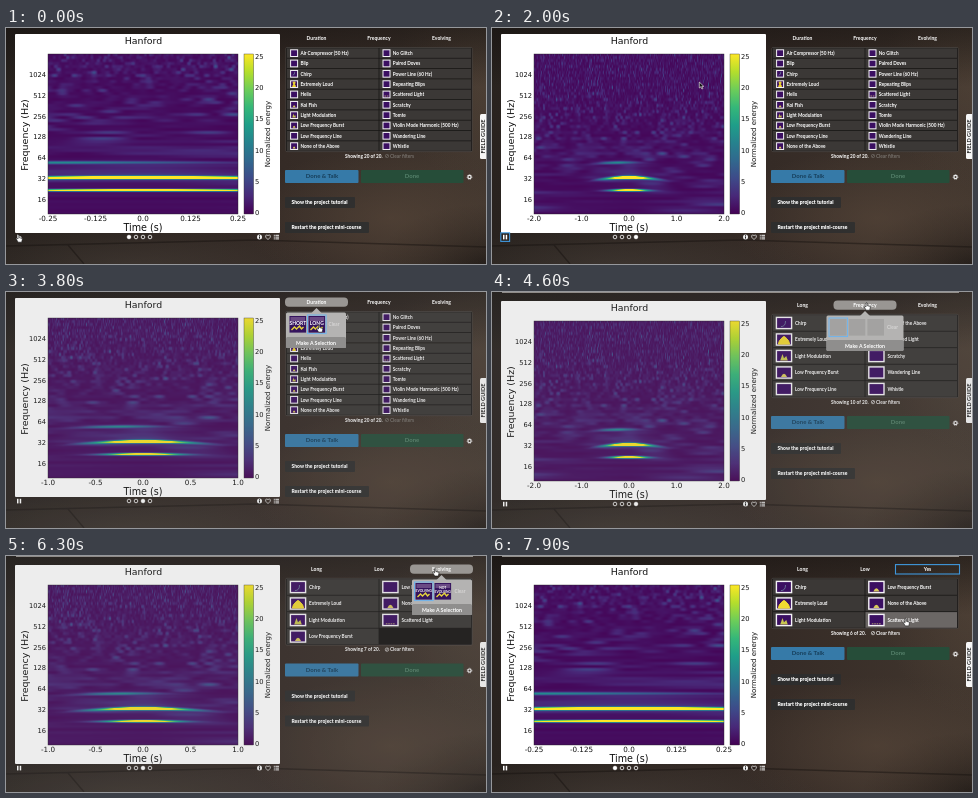
Write an HTML page with a canvas that moves like this. It is 480 px wide and 236 px high and loops after 8 s.

```html
<!DOCTYPE html>
<html lang="en">
<head>
<meta charset="utf-8">
<title>Spectrogram classifier</title>
<style>
html, body { margin: 0; width: 100%; height: 100%; overflow: hidden; background: #2a2420; }
#stage {
  position: relative; width: 480px; height: 236px; overflow: hidden;
  background:
    linear-gradient(rgba(14,11,10,.45), rgba(14,11,10,0) 25%),
    radial-gradient(ellipse 150px 70px at 385px 190px, rgba(92,74,60,.55), transparent),
    radial-gradient(ellipse 90px 110px at 480px 50px, rgba(92,76,62,.4), transparent),
    radial-gradient(ellipse 110px 60px at 480px 236px, rgba(16,13,12,.6), transparent),
    radial-gradient(ellipse 200px 40px at 130px 240px, rgba(74,66,60,.5), transparent),
    linear-gradient(90deg, #29231f, #352b26 58%, #41362e);
}
canvas, svg { position: absolute; left: 0; top: 0; }
#card { position: absolute; left: 9px; width: 265px; height: 199px; background: #fff; border-radius: 1px; }
#spec { left: 42px; }
svg text { white-space: pre; }
.plot { font-family: "DejaVu Sans", sans-serif; fill: #111; }
.ui { font-family: Lato, sans-serif; font-weight: 700; font-size: 4.7px; fill: #fff; }
</style>
</head>
<body>
<div id="stage">
  <div id="card"></div>
  <canvas id="spec" width="190" height="160"></canvas>
  <svg id="view" width="480" height="236" viewBox="0 0 480 236"></svg>
</div>
<script>
const LOOP = 8000, TICK = 100;
const $ = id => document.getElementById(id);
const view = $('view'), spec = $('spec'), card = $('card');
const pen = spec.getContext('2d');

// ---- spectrogram ----
const VIRIDIS = [[68,1,84],[72,40,120],[62,74,137],[49,104,142],[38,130,142],
  [31,158,137],[53,183,121],[109,205,89],[180,222,44],[253,231,37]];
const SPANS = [0.25, 0.5, 1, 2];
const X_LABELS = [['-0.25','-0.125','0.0','0.125','0.25'], ['-0.5','-0.25','0.0','0.25','0.5'],
  ['-1.0','-0.5','0.0','0.5','1.0'], ['-2.0','-1.0','0.0','1.0','2.0']];

function viridis(v) {
  const p = Math.max(0, Math.min(.9999, v)) * 9, i = Math.floor(p), k = p - i;
  return VIRIDIS[i].map((c, n) => c + (VIRIDIS[i + 1][n] - c) * k);
}
const mix = (a, b, k) => a + (b - a) * k * k * (3 - 2 * k);
function burst(j, i) {
  const s = Math.sin(j * 127.1 + i * 311.7) * 43758.5453;
  return -Math.log(1 - (s - Math.floor(s)) * .999);
}
const ROW = 3;
const freqAt = y => 16 * 2 ** ((145 - y) / 20.75);
// Blobs shorten in time as frequency rises.
function band(j, t) {
  const p = t * freqAt(j * ROW) / 13 + 500, i = Math.floor(p);
  return mix(burst(j, i), burst(j, i + 1), p - i);
}
const bell = (d, w) => Math.exp(-(d * d) / (w * w));

function energy(t, y) {
  const j = Math.floor(y / ROW);
  let e = .4 + mix(band(j, t), band(j + 1, t), y / ROW - j);
  const drop = 5 * Math.min(t * t, .7);
  e += 40 * bell(y - 123 - drop, 1.4) * bell(t, .46);
  e += 38 * bell(y - 135.7 - drop * .3, 1.15) * bell(t, .36);
  e += 9 * bell(y - 108 - drop * .5, 1.4) * bell(t + .22, .42);
  return e + 2 * bell(y - 119, 8) * bell(t, .5);
}

const pictures = SPANS.map(span => {
  const img = pen.createImageData(190, 160);
  for (let y = 0, o = 0; y < 160; y++) for (let x = 0; x < 190; x++, o += 4) {
    const rgb = viridis(energy((x - 94.5) / 95 * span, y) / 25.5);
    img.data.set([...rgb, 255], o);
  }
  return img;
});

// ---- svg helpers ----
const rect = (x, y, w, h, fill, more = '') =>
  `<rect x="${x}" y="${y}" width="${w}" height="${h}" fill="${fill}" ${more}/>`;
const text = (x, y, s, cls, more = '') => `<text x="${x}" y="${y}" class="${cls}" ${more}>${s}</text>`;
const path = (d, more) => `<path d="${d}" ${more}/>`;
const MID = 'text-anchor="middle" ';
const size = n => `style="font-size:${n}px" `;
const tint = c => `style="fill:${c}" `;
const label = (x, y, s, more = '') => text(x, y + 1.7, s, 'ui', more);
const BLUE = '#3f97dc';
const outline = (x, y, w, h) => rect(x, y, w, h, 'none', `stroke="${BLUE}" stroke-width="1.1"`);

function chart(zoom) {
  const upright = (x, y, s, n) => text(0, 0, s, 'plot', MID + size(n) + `transform="translate(${x} ${y}) rotate(-90)"`);
  let s = text(137.5, 16, 'Hanford', 'plot', MID + size(9.4));
  s += upright(21.7, 107, 'Frequency (Hz)', 9.5) + upright(264.3, 106, 'Normalized energy', 7);
  s += text(137, 203, 'Time (s)', 'plot', MID + size(9.6));
  for (let n = 0; n < 7; n++) {
    const y = 171 - n * 20.75;
    s += text(40, y + 2.5, 16 * 2 ** n, 'plot', 'text-anchor="end" ' + size(6.7));
  }
  X_LABELS[zoom].forEach((v, n) => s += text(42 + n * 47.5, 192.5, v, 'plot', MID + size(7.2)));
  const stops = VIRIDIS.map((c, n) => `<stop offset="${n / 9}" stop-color="rgb(${c})"/>`).join('');
  s += `<linearGradient id="scale" x1="0" y1="1" x2="0" y2="0">${stops}</linearGradient>`;
  s += rect(238, 26, 9.6, 160, 'url(#scale)', 'stroke="#333" stroke-width=".4"');
  for (let v = 0; v <= 25; v += 5) s += text(249, 187.3 - v * 6.27, v, 'plot', size(6.7));
  return s + rect(42, 26, 190, 160, 'none', 'stroke="#222" stroke-width=".4"');
}

function toolbar(zoom, playing, focused) {
  let s = '';
  if (playing) s += rect(11, 206.8, 1.5, 4.6, '#fff') + rect(13.7, 206.8, 1.5, 4.6, '#fff');
  else s += path('M11 206.5l5 2.8l-5 2.8z', 'fill="#fff"');
  if (focused) s += outline(8.8, 204.8, 8.8, 8.6);
  for (let n = 0; n < 4; n++)
    s += `<circle cx="${123 + n * 7}" cy="209" r="1.8" fill="${n === zoom ? '#fff' : 'none'}" stroke="#fff" stroke-width=".8"/>`;
  s += '<circle cx="253.5" cy="209" r="2.5" fill="#eee"/>' + rect(253, 208.4, 1, 2.2, '#222') + rect(253, 207.2, 1, .8, '#222');
  s += path('M262 211.6l-2.3-2.4q-.6-2.2 1.1-2.2q.9 0 1.2.9q.3-.9 1.2-.9q1.7 0 1.1 2.2z', 'fill="none" stroke="#eee" stroke-width=".7"');
  for (let n = 0; n < 3; n++) s += rect(267.8, 206.8 + n * 1.8, 1, 1, '#eee') + rect(269.4, 206.8 + n * 1.8, 3.6, 1, '#eee');
  return s;
}

// ---- choices ----
const ALL = ['Air Compressor (50 Hz)', 'Blip', 'Chirp', 'Extremely Loud', 'Helix', 'Koi Fish',
  'Light Modulation', 'Low Frequency Burst', 'Low Frequency Line', 'None of the Above',
  'No Glitch', 'Paired Doves', 'Power Line (60 Hz)', 'Repeating Blips', 'Scattered Light', 'Scratchy',
  'Tomte', 'Violin Mode Harmonic (500 Hz)', 'Wandering Line', 'Whistle'];
const pick = (...ids) => ids.map(i => ALL[i]);
const LONG = pick(2, 3, 6, 7, 8, 9, 14, 15, 18, 19);
const LOW = pick(2, 3, 6, 7, 8, 9, 14);
const YES = pick(2, 3, 6, 7, 9, 14);

function thumb(x, y, w, h, name) {
  const cx = x + w / 2, b = y + h - 1;
  let s = rect(x, y, w, h, '#3b0f62', `stroke="#f4f2f6" stroke-width="${w > 10 ? 1.4 : 1}"`);
  if (name === 'Extremely Loud')
    s += path(`M${x + 2} ${b}l1-${h * .3}l${w / 2 - 4} -${h * .35}h2l${w / 2 - 4} ${h * .35}l1 ${h * .3}z`, 'fill="#f1d931" stroke="#f1d931" stroke-width="1"');
  else if (name === 'Light Modulation')
    s += path(`M${x + w * .25} ${b}l${w * .15} -${h * .6}l${w * .1} ${h * .4}l${w * .15} -${h * .2}l${w * .1} ${h * .4}z`, 'fill="#c9c650"');
  else if (/Burst|None|Fish/.test(name))
    s += path(`M${cx - w / 5} ${b}q${w / 5} ${-h * .6} ${w * .4} 0z`, 'fill="#d8c95c"');
  else if (name === 'Scattered Light')
    s += path(`M${x + w * .2} ${b - .8}h${w * .6}`, 'stroke="#c9bf7a" stroke-width=".8" stroke-dasharray="1.6 .8"');
  else if (name === 'Chirp')
    s += path(`M${x + w * .3} ${b - 1}q${w * .3} 0 ${w * .3} ${-h * .5}`, 'fill="none" stroke="#7fa8b0" stroke-width=".6"');
  return s;
}

function list(names, hover) {
  const full = names.length > 10, rows = Math.ceil(names.length / 2);
  const step = full ? 10.33 : 16.5, top = full ? 20 : 19.8;
  let s = rect(279.8, top - .5, 186.4, rows * step + .8, '#191716', 'rx="1" stroke="#5d5854" stroke-width=".5"');
  for (let n = 0; n < rows * 2; n++) {
    const name = names[n], col = n < rows ? 0 : 1, row = n % rows;
    const x = 281 + col * 92.4, y = top + row * step;
    if (!name) continue;
    s += rect(x, y + .3, 91.6, step - .8, name === hover ? '#6b6765' : '#3b3836');
    if (full) s += thumb(x + 3.6, y + 1.8, 7, 6.7, name);
    else s += thumb(x + 3.4, y + 2.6, 15.2, 11.2, name);
    s += label(x + (full ? 13.4 : 22), y + step / 2, name);
  }
  return s;
}

function lower(names) {
  const rows = Math.ceil(names.length / 2), few = names.length <= 10;
  const y = few ? 24.6 + rows * 16.5 : 128;
  let s = label(339, y, `Showing ${names.length} of 20.`);
  const c = few ? '#f2f2f2' : '#77726d';
  s += `<circle cx="381" cy="${y}" r="1.7" fill="none" stroke="${c}" stroke-width=".6"/>`
    + path(`M379.9 ${y + 1.1}l2.2-2.2`, `stroke="${c}" stroke-width=".6"`)
    + label(384, y, 'Clear filters', tint(c));
  const b = y + 20.5;
  s += rect(279, b - 6.5, 73.5, 13, '#367aa8', 'rx="1"') + rect(355, b - 6.5, 102.5, 13, '#264d39', 'rx="1"');
  s += label(316, b, 'Done &amp; Talk', MID + 'style="fill:#173f5b;font-size:6px"');
  s += label(406, b, 'Done', MID + 'style="fill:#55806a;font-size:6px"');
  s += `<circle cx="463.5" cy="${b + .5}" r="1.6" fill="none" stroke="#eee" stroke-width="1.2"/>`
    + `<circle cx="463.5" cy="${b + .5}" r="2.4" fill="none" stroke="#eee" stroke-width=".7" stroke-dasharray=".9 .98"/>`;
  ['Show the project tutorial', 'Restart the project mini-course'].forEach((t, n) => {
    s += rect(279, y + 41 + n * 25, n ? 84 : 70, 11, '#2b2d2f', 'rx="1" opacity=".8"')
      + label(285.5, y + 46.5 + n * 25, t, 'style="font-size:5px;font-weight:900"');
  });
  return s;
}

// ---- filter tabs and their menus ----
const TAB_X = [310.5, 373, 435.5];
const MENUS = [
  { x: 280, w: 60, gap: 19, icons: ['SHORT', 'LONG'], on: 1, clear: 328 },
  { x: 334.5, w: 77, gap: 18.7, icons: ['', '', ''], on: 0, clear: 400.5 },
  { x: 406, w: 60, gap: 19, icons: ['EVOLVING', 'NOT EVOLVING'], on: 0, clear: 454 }
];

function tabs(names, open, focus) {
  let s = '';
  names.forEach((t, n) => {
    if (n === open) s += rect(TAB_X[n] - 31.5, 5.6, 63, 9.2, '#999693', 'rx="4"');
    if (n === focus) s += outline(TAB_X[n] - 32, 5.6, 64, 9.4);
    s += label(TAB_X[n], 10, t, MID + size(5));
  });
  return s;
}

function menu(n) {
  const m = MENUS[n], c = TAB_X[n];
  let s = path(`M${c - 5} 21l5-5l5 5z`, 'fill="#b4b3b2"');
  s += rect(m.x, 20.5, m.w, 35.5, '#b4b3b2', 'rx="1.5"') + rect(m.x, 45, m.w, 11, '#8f8e8d', 'rx="1.5"');
  m.icons.forEach((t, k) => {
    const x = m.x + 3.5 + k * m.gap, mid = x + 8.3;
    s += rect(x, 24, 16.6, 16.6, t ? '#35145e' : '#a3a2a1');
    if (t) {
      s += rect(x + 1, 25, 14.6, 4, '#6a4a84') + path(`M${x + 2} 38l3-3l2 2l3-3l2 3l2-2`, 'fill="none" stroke="#e6d53c" stroke-width="1.4"');
      t.split(' ').forEach((word, r, all) => {
        const big = word.length < 6 && all.length < 2;
        s += text(mid, (all.length > 1 ? 30 : 33) + r * 4, word, 'ui', MID + size(big ? 5 : 3.3));
      });
    }
    if (k === m.on) s += rect(x - 1, 23, 18.6, 18.6, 'none', 'stroke="#6eb4ee" stroke-width="1"');
  });
  s += label(m.clear, 32, 'Clear', MID + tint('#d6d5d4'));
  return s + label(m.x + m.w / 2, 51, 'Make A Selection', MID + size(5.2));
}

// ---- timeline ----
const FILTERS = [
  [0, ALL, ['Duration', 'Frequency', 'Evolving']],
  [4000, LONG, ['Long', 'Frequency', 'Evolving']],
  [5100, LOW, ['Long', 'Low', 'Evolving']],
  [6900, YES, ['Long', 'Low', 'Yes']]
];
// start, open menu, focused tab
const FOCUS = [[0, -1, -1], [2900, 0, -1], [4000, -1, 0], [4400, 1, -1], [5100, -1, 1], [6000, 2, -1], [6900, -1, 2]];
// time, x, y, hand shape
const MOVES = [[0, 12, 209, 1], [400, 12, 210, 1], [1000, 60, 160, 0], [1700, 206, 58, 0], [2200, 208, 55, 0],
  [2700, 310, 10, 1], [3100, 310, 12, 1], [3600, 312, 34, 1], [4000, 313, 36, 1], [4400, 374, 13, 1],
  [4700, 374, 13, 1], [5000, 346, 34, 1], [5150, 346, 34, 0], [5550, 408, 20, 0], [5700, 410, 19, 0],
  [6000, 432, 14, 1], [6400, 428, 15, 1], [6750, 417, 35, 1], [6950, 417, 36, 1], [7500, 414, 62, 1], [8000, 413, 65, 1]];
const at = (table, t) => table.filter(r => r[0] <= t).pop();

function pointer(t) {
  const a = at(MOVES, t), b = MOVES[MOVES.indexOf(a) + 1] || a;
  const k = b === a ? 0 : (t - a[0]) / (b[0] - a[0]);
  const d = a[3] ? 'M0 0v4l-1.2-.9l-.7.7l2 3.4h3.6l.8-3.6l-3.3-1V0q-.6-.7-1.2 0z' : 'M0 0v6l1.5-1.3l1.1 2.3l1-.5l-1.1-2.2h2z';
  return path(d, `transform="translate(${mix(a[1], b[1], k)} ${mix(a[2], b[2], k) - 2})" fill="${a[3] ? '#fff' : '#111'}" stroke="${a[3] ? '#111' : '#fff'}" stroke-width=".6"`);
}

const FLOOR = path('M0 218L250 212L480 219M62 217L78 236', 'fill="none" stroke="#14100e" stroke-width="1.4" opacity=".45"');
const GUIDE = rect(474, 86, 8, 45, '#f7f7f7', 'rx="1.5"')
  + text(0, 0, 'FIELD GUIDE', 'ui', MID + 'transform="translate(479.2 108.5) rotate(-90)" style="fill:#222;font-size:5.6px"');

let lastTick = -1, lastZoom = -1;
function draw(t) {
  const zoom = (Math.floor((t - 4130) / 667) + 11) % 4;
  const [, names, titles] = at(FILTERS, t), [, open, focus] = at(FOCUS, t);
  const shift = t >= 4000 ? 3 : 0;
  if (zoom !== lastZoom) pen.putImageData(pictures[lastZoom = zoom], 0, 0);
  card.style.top = 6 + shift + 'px';
  spec.style.top = 26 + shift + 'px';
  let s = FLOOR;
  if (shift) s += rect(10, 0, 457, .8, '#d8d4d0', 'opacity=".8"');
  s += `<g transform="translate(0 ${shift})">` + chart(zoom) + toolbar(zoom, t >= 100, t >= 100 && t < 2900)
    + list(names, t >= 7500 ? 'Scattered Light' : '') + lower(names) + '</g>' + GUIDE;
  if (open >= 0) s += rect(0, 0, 480, 236, '#787878', 'opacity=".13"');
  s += `<g transform="translate(0 ${shift})">` + tabs(titles, open, focus) + (open >= 0 ? menu(open) : '') + '</g>';
  view.innerHTML = s + pointer(t);
}

function frame() {
  const tick = Math.floor(performance.now() % LOOP / TICK);
  if (tick !== lastTick) draw((lastTick = tick) * TICK);
  requestAnimationFrame(frame);
}
frame();
</script>
</body>
</html>
```
